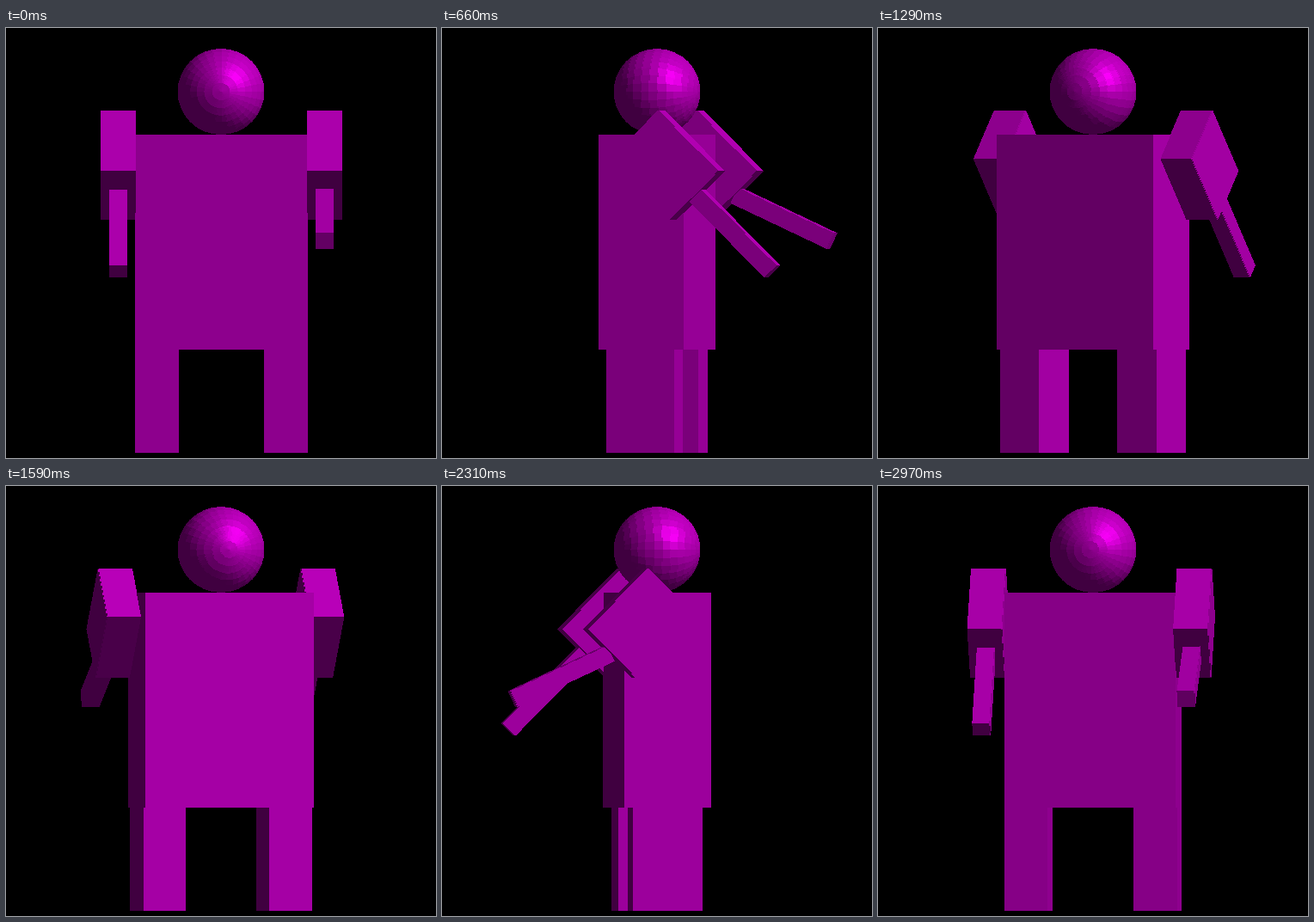
Recreate the animation shown at these times as an HTML page with a canvas. Size 500x500 px, loop 3000 ms.

```html
<!DOCTYPE html>
<html lang="en">
<head>
<meta charset="utf-8">
<title>Turning figure</title>
<style>
  html, body { margin: 0; width: 100%; height: 100%; overflow: hidden; background: #000; }
  canvas { display: block; width: 500px; height: 500px; }
</style>
</head>
<body>
<canvas id="stage" width="500" height="500"></canvas>
<script>
const SIZE = 500, MID = 250, STEP_MS = 30, STEPS = 100;
const ctx = document.getElementById('stage').getContext('2d');
const image = ctx.createImageData(SIZE, SIZE);
const pixels = new Uint32Array(image.data.buffer);
const depth = new Float32Array(SIZE * SIZE);
const rad = deg => deg * Math.PI / 180;

// Model space: x right, y down the stage, z towards the viewer.
const faces = [];

// A box hanging from a pivot, swung forward by pitch degrees.
function box(cx, width, length, thick, py, pz, pitch) {
  const s = Math.sin(rad(pitch)), c = Math.cos(rad(pitch));
  const turn = (x, v, w) => [x, v * c - w * s, v * s + w * c];
  const point = (i, j, k) => {
    const [x, y, z] = turn(cx + i * width / 2, (j + 1) * length / 2, k * thick / 2);
    return [x, y + py, z + pz];
  };
  const ring = [[-1, -1], [1, -1], [1, 1], [-1, 1]];
  for (const e of [-1, 1]) {
    faces.push({ normal: turn(e, 0, 0), points: ring.map(([a, b]) => point(e, a, b)) });
    faces.push({ normal: turn(0, e, 0), points: ring.map(([a, b]) => point(a, e, b)) });
    faces.push({ normal: turn(0, 0, e), points: ring.map(([a, b]) => point(a, b, e)) });
  }
}

// A faceted ball with its poles on the z axis.
function ball(cy, radius, slices, stacks) {
  const dir = (i, j) => {
    const a = i * 2 * Math.PI / slices, b = j * Math.PI / stacks;
    return [Math.sin(b) * Math.cos(a), Math.sin(b) * Math.sin(a), Math.cos(b)];
  };
  const point = (i, j) => {
    const [x, y, z] = dir(i, j);
    return [x * radius, y * radius + cy, z * radius];
  };
  for (let j = 0; j < stacks; j++) {
    for (let i = 0; i < slices; i++) {
      faces.push({
        normal: dir(i + 0.5, j + 0.5),
        points: [point(i, j), point(i + 1, j), point(i + 1, j + 1), point(i, j + 1)]
      });
    }
  }
}

const SHOULDER = 124, ELBOW = 100 * Math.SQRT1_2;
ball(74, 50, 32, 16);
box(0, 200, 250, 100, SHOULDER, 0, 0);
for (const side of [-1, 1]) {
  box(side * 75, 50, 120, 80, 374, 0, 0);
  box(side * 120, 40, 100, 80, SHOULDER, 0, 45);
  box(side * 120, 20, 125, 20, SHOULDER + ELBOW, ELBOW, side < 0 ? 45 : 65);
}

// Ambient, diffuse and mirror light from the upper right front.
const L = 1 / Math.sqrt(3);
function shade([x, y, z]) {
  const lit = (x - y + z) * L;
  let v = 63.75;
  if (lit > 0) {
    v += 127.5 * lit + 72 * Math.max(0, 2 * lit * z - L) ** 5.5;
  }
  v = Math.min(255, Math.round(v));
  return (0xff000000 | v << 16 | v) >>> 0;
}

function fillFace(points, n, color) {
  const ys = points.map(p => p[1]);
  const nearest = Math.max(...points.map(p => p[2]));
  const [ox, oy, oz] = points[0];
  const top = Math.ceil(Math.min(...ys) - 0.5);
  const bottom = Math.ceil(Math.max(...ys) - 0.5);
  for (let row = top; row < bottom; row++) {
    const y = row + 0.5;
    let left = Infinity, right = -Infinity;
    points.forEach((a, i) => {
      const b = points[(i + 1) % points.length];
      if ((a[1] <= y) === (b[1] <= y)) return;
      const x = a[0] + (b[0] - a[0]) * (y - a[1]) / (b[1] - a[1]);
      left = Math.min(left, x);
      right = Math.max(right, x);
    });
    const last = Math.floor(right + 1e-6);
    for (let col = Math.floor(left + 1e-6); col <= last; col++) {
      const z = oz - (n[0] * (col + 0.5 - ox) + n[1] * (y - oy)) / n[2];
      const d = Math.min(z, nearest), at = row * SIZE + col;
      if (d > depth[at]) {
        depth[at] = d;
        pixels[at] = color;
      }
    }
  }
}

function draw(step) {
  const s = Math.sin(rad(step * 360 / STEPS)), c = Math.cos(rad(step * 360 / STEPS));
  const spin = ([x, y, z]) => [x * c + z * s, y, z * c - x * s];
  pixels.fill(0xff000000);
  depth.fill(-1e4);
  for (const face of faces) {
    const n = spin(face.normal);
    if (n[2] < 1e-3) continue;
    const points = face.points.map(p => {
      const q = spin(p);
      q[0] += MID;
      return q;
    });
    fillFace(points, n, shade(n));
  }
  ctx.putImageData(image, 0, 0);
}

const start = performance.now();
let shown = -1;
function tick() {
  const step = Math.floor((performance.now() - start) / STEP_MS) % STEPS;
  if (step !== shown) draw(shown = step);
  requestAnimationFrame(tick);
}
tick();
</script>
</body>
</html>
```
